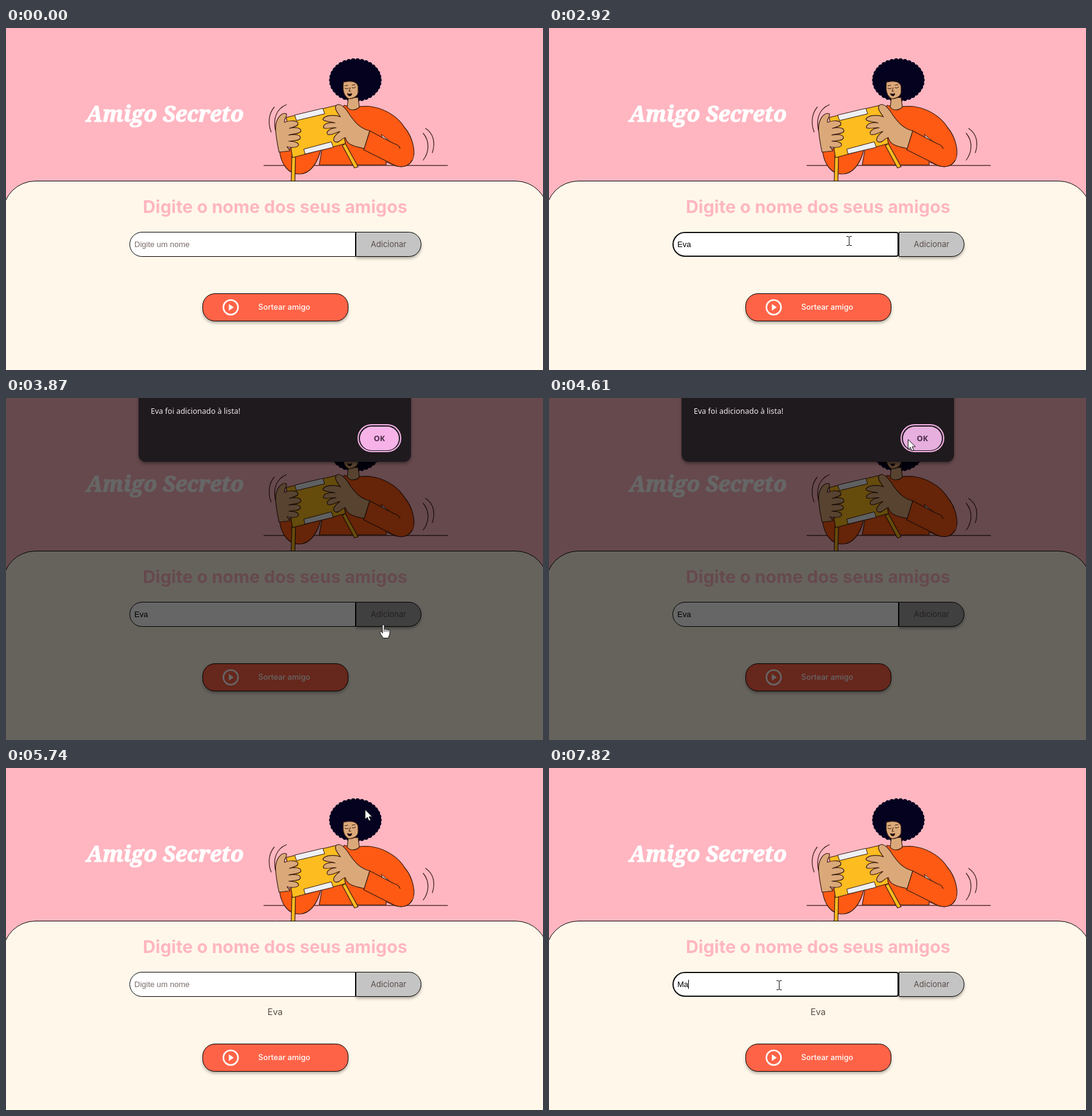
These frames come from a looping animation (883 px wide and 562 px high, 8000 ms). An HTML page with a canvas:

```html
<!DOCTYPE html>
<html lang="pt-BR">
<head>
<meta charset="utf-8">
<title>Amigo Secreto</title>
<style>
html, body { margin: 0; width: 100%; height: 100%; overflow: hidden; background: #ffb6c1; }
canvas { display: block; }
</style>
</head>
<body>
<canvas id="stage" width="883" height="562"></canvas>
<script>
const ctx = document.getElementById('stage').getContext('2d');
const LOOP = 8000;
const FRIEND = 'Eva';
const INK = '#3a1c14', SKIN = '#dba979', ORANGE = '#ff5a14', YELLOW = '#fdbc1f', TEXT = '#584c48';
const UI = 'Inter, sans-serif', FIELD = '"Liberation Sans", Arial, sans-serif', SYSTEM = '"Noto Sans", sans-serif';

const between = (t, a, b) => t >= a && t < b;

function shape(d, fill, stroke, width = 1.2) {
  const path = new Path2D(d);
  if (fill) { ctx.fillStyle = fill; ctx.fill(path); }
  if (stroke) { ctx.strokeStyle = stroke; ctx.lineWidth = width; ctx.stroke(path); }
}

function box(x, y, w, h, radii, fill, stroke, width = 1, shadow = false) {
  ctx.beginPath();
  ctx.roundRect(x, y, w, h, radii);
  if (fill) {
    ctx.save();
    if (shadow) {
      ctx.shadowColor = 'rgba(0,0,0,.35)';
      ctx.shadowBlur = 5;
      ctx.shadowOffsetY = 3;
    }
    ctx.fillStyle = fill;
    ctx.fill();
    ctx.restore();
  }
  if (stroke) { ctx.strokeStyle = stroke; ctx.lineWidth = width; ctx.stroke(); }
}

function label(text, x, y, font, color, align = 'left') {
  ctx.font = font;
  ctx.fillStyle = color;
  ctx.textAlign = align;
  ctx.fillText(text, x, y);
}

// Pointer movement: quadratic paths, sampled in a fixed number of steps
const moves = [
  { start: 70, end: 640, steps: 9, power: 1, path: [565, 445, 510, 400, 451, 349] },
  { start: 2650, end: 3200, steps: 8, power: 2, path: [451, 349, 535, 349, 620, 372] },
  { start: 4340, end: 4610, steps: 5, power: 1, path: [620, 372, 632, 190, 590, 68] },
  { start: 5940, end: 6490, steps: 9, power: 1, path: [590, 68, 500, 260, 378, 357] }
];

function pointerAt(t) {
  const move = moves.filter(m => t >= m.start).pop() || moves[0];
  const { start, end, steps, power, path: [x0, y0, x1, y1, x2, y2] } = move;
  const k = Math.max(0, Math.min(steps - 1, Math.floor((t - start) / (end - start) * (steps - 1))));
  const p = ((k + 1) / steps) ** power, q = 1 - p;
  return {
    x: Math.round(q * q * x0 + 2 * p * q * x1 + p * p * x2),
    y: Math.round(q * q * y0 + 2 * p * q * y1 + p * p * y2)
  };
}

function stateAt(t) {
  const pointer = pointerAt(t);
  const inside = (x, y, w, h) => pointer.x >= x && pointer.x < x + w && pointer.y >= y && pointer.y < y + h;
  const dialog = between(t, 3870, 5740);
  const listed = t >= 5740;
  const shown = t >= 70 && !between(t, 730, 2450);
  const onAdd = inside(575, 335, 108, 41), onDraw = inside(323, listed ? 453 : 436, 240, 46);
  let kind = 'arrow';
  if (dialog ? t < 4340 : onAdd || onDraw) kind = 'hand';
  else if (!dialog && inside(203, 335, 372, 41)) kind = 'beam';

  let typed = '';
  if (t >= 7490) typed = t < 7820 ? 'M' : 'Ma';
  else if (between(t, 1380, 5740)) typed = FRIEND.slice(0, t < 1780 ? 1 : t < 1920 ? 2 : 3);

  return {
    pointer, kind, shown, dialog, listed, typed,
    addHover: dialog || (shown && onAdd),
    okHover: dialog && inside(582, 46, 65, 41),
    focused: between(t, 660, 3670) || t >= 6490,
    caret: [[660, 1190], [1380, 2450], [2980, 3540], [6490, 7020], [7490, LOOP]].some(([a, b]) => between(t, a, b)),
    pressed: [[660, 730], [3670, 3870], [5600, 5740], [6490, 6560]].some(([a, b]) => between(t, a, b))
  };
}

function drawTitle() {
  label('Amigo Secreto', 261.5, 154, 'italic bold 35.6px "Noto Serif", serif', '#fff', 'center');
  ctx.strokeStyle = '#fff';
  ctx.lineWidth = 1.2;
  ctx.strokeText('Amigo Secreto', 261.5, 154);
}

function drawPerson() {
  ctx.lineJoin = ctx.lineCap = 'round';
  shape('M424 225.8H726', null, INK, 1.2);
  shape('M441 130C431 142 431 158 436 171M461 126C444 133 439 150 443 168', null, INK);
  shape('M686 173C697 186 696 204 686 217M690 165C704 174 706 190 701 205', null, INK);

  // Sleeves and torso
  shape('M450 204L468 198L518 199C512 223 500 240 482 240C464 240 453 224 450 204Z', ORANGE, INK);
  shape('M556 127C575 132 588 127 600 129C632 134 649 153 655 163C668 178 676 205 667 219C659 231 644 229 632 223L625 220V225H515L520 197L545 150Z', ORANGE, INK);
  shape('M617 175L621 187L634 189Z', '#f4e4e2', INK, 1);
  shape('M598 169L588 200L630 222C645 230 660 231 668 217C672 209 670 199 664 184L640 191Z', ORANGE);
  shape('M598 169L588 200L632 222C645 230 660 231 668 217M598 169L638 190Q646 192 648 198', null, INK);

  // Hair, neck and face
  ctx.fillStyle = '#04021f';
  ctx.beginPath();
  ctx.ellipse(574.5, 85.5, 40, 32.5, 0, 0, 7);
  ctx.fill();
  for (let i = 0; i < 34; i++) {
    const a = i / 34 * Math.PI * 2;
    ctx.beginPath();
    ctx.arc(574.5 + 39 * Math.cos(a), 85.5 + 31.5 * Math.sin(a), 4.3, 0, 7);
    ctx.fill();
  }
  shape('M563 115L561 130C565 136 575 136 581 130L579 114Z', SKIN, INK);
  shape('M555 89C553 101 555 112 563 116C571 117 578 112 579 106V96C577 88 569 86 555 89Z', SKIN, INK);
  shape('M557 99Q560 101 563 99M569 98Q572 100 575 97M557 95L562 94M569 94L574 93M566 98L564 104H567', null, INK, 1);
  shape('M561 107Q565 109 569 107Q569 112 565 112Q561 111 561 107Z', '#1c0710');

  // Parcel
  shape('M470 210H476L475 253H469ZM553 193L558 190L579 228L573 230Z', YELLOW, INK);
  shape('M461 147L548 126L558 190L471 213Z', YELLOW, INK);
  shape('M475 143L521 132L524 141L478 152ZM490 199L535 187L538 196L492 207Z', '#eef0f4', INK, 1);

  // Hands
  shape('M449 204C445 185 442 165 444 157C447 145 455 138 461 141C463 146 456 150 458 155C468 151 480 152 480 157C481 162 470 163 466 165C475 162 485 164 485 169C485 174 470 174 465 176C475 174 485 175 484 181C482 186 472 185 465 186C474 186 482 188 481 193C478 197 466 197 462 195L467 202Z', SKIN, INK);
  shape('M598 169C582 165 574 155 566 144C560 134 552 124 545 126C538 129 543 137 550 146C540 142 524 143 521 150C523 155 535 153 541 156C530 154 521 158 522 164C526 167 536 163 543 164C533 165 525 170 529 175C536 177 543 171 549 170C542 175 535 183 541 187C548 190 553 180 558 180C560 190 568 194 589 198Z', SKIN, INK);
}

function drawForm(s) {
  box(-5, 251.5, 896, 400, 53, '#fff8ea', '#000');
  label('Digite o nome dos seus amigos', 442.5, 304, 'bold 28.8px ' + UI, '#ffb6c1', 'center');

  box(575.5, 335.5, 107, 40, [0, 20, 20, 0], s.addHover ? '#a0a0a0' : '#c4c4c4', '#000', 1, true);
  label('Adicionar', 629, 360, '13px ' + UI, TEXT, 'center');
  if (s.focused) box(204, 336, 370, 39, [20, 3, 3, 20], '#fff', '#101010', 2);
  else box(203.5, 335.5, 371, 40, [20, 0, 0, 20], '#fff', '#000');

  label(s.typed || 'Digite um nome', 211, 360, '13px ' + FIELD, s.typed ? '#000' : '#7a6e6a');
  if (s.caret) {
    const width = s.typed ? ctx.measureText(s.typed).width : 0;
    ctx.fillStyle = '#000';
    ctx.fillRect(Math.max(212, Math.round(211 + width)), 348, 1, 15);
  }

  if (s.listed) label(FRIEND, 442.5, 406, '14.6px ' + UI, TEXT, 'center');
  ctx.save();
  if (s.listed) ctx.translate(0, 17);
  box(323.5, 436.5, 239, 45, 20, '#ff6347', '#000', 1, true);
  ctx.beginPath();
  ctx.arc(369.5, 459, 12, 0, 7);
  ctx.strokeStyle = '#fff';
  ctx.lineWidth = 2.6;
  ctx.stroke();
  shape('M366.5 453.5V464.5L374.5 459Z', '#fff');
  label('Sortear amigo', 457.5, 463, '500 12.7px ' + UI, '#fff', 'center');
  ctx.restore();
}

function drawDialog(s) {
  ctx.fillStyle = 'rgba(0,0,0,.6)';
  ctx.fillRect(0, 0, 883, 562);
  box(218, -20, 448, 125, 12, '#1f1a1e', null, 1, true);
  label(FRIEND + ' foi adicionado à lista!', 238, 26, '12.5px ' + SYSTEM, '#f1e8ee');
  box(579, 44, 70, 44, 22, null, '#f7b3e8', 2);
  box(582, 47, 64, 39, 19.5, s.okHover ? '#e6afde' : '#f7b3e8');
  label('OK', 614, 71, '600 12.5px ' + SYSTEM, '#4b2b46', 'center');
}

function drawPointer(s) {
  ctx.save();
  ctx.translate(s.pointer.x, s.pointer.y);
  if (s.pressed) {
    ctx.fillStyle = 'rgba(255,242,20,.55)';
    ctx.beginPath();
    ctx.arc(0, 0, 12, 0, 7);
    ctx.fill();
  }
  if (s.kind === 'beam') {
    shape('M-3.5 -7.5H-1L.5 -6.5L2 -7.5H4.5M.5 -6.5V6.5M-3.5 7.5H-1L.5 6.5L2 7.5H4.5', null, '#111', 1);
  } else if (s.kind === 'hand') {
    shape('M-1 1.5Q.5 -.5 2 1.5V8Q4 6.5 5 8.5Q7 7 8 9Q10.5 8 11 10.5V16L8.5 22.5H.5L-4 16Q-6 12.5-4 11.5Q-2.5 11-1 14Z', '#fff', '#111', 1);
    shape('M2 8V12M5 8.5V12M8 9V12', null, '#111', 1);
  } else {
    shape('M.5 .5V16.5L4.2 13L6.8 18.8L9.6 17.6L7 12H12Z', '#fff', '#111', 1);
  }
  ctx.restore();
}

function render() {
  const s = stateAt(performance.now() % LOOP);
  ctx.fillStyle = '#ffb6c1';
  ctx.fillRect(0, 0, 883, 562);
  drawTitle();
  drawPerson();
  drawForm(s);
  if (s.dialog) drawDialog(s);
  if (s.shown) drawPointer(s);
  requestAnimationFrame(render);
}
render();
</script>
</body>
</html>
```
